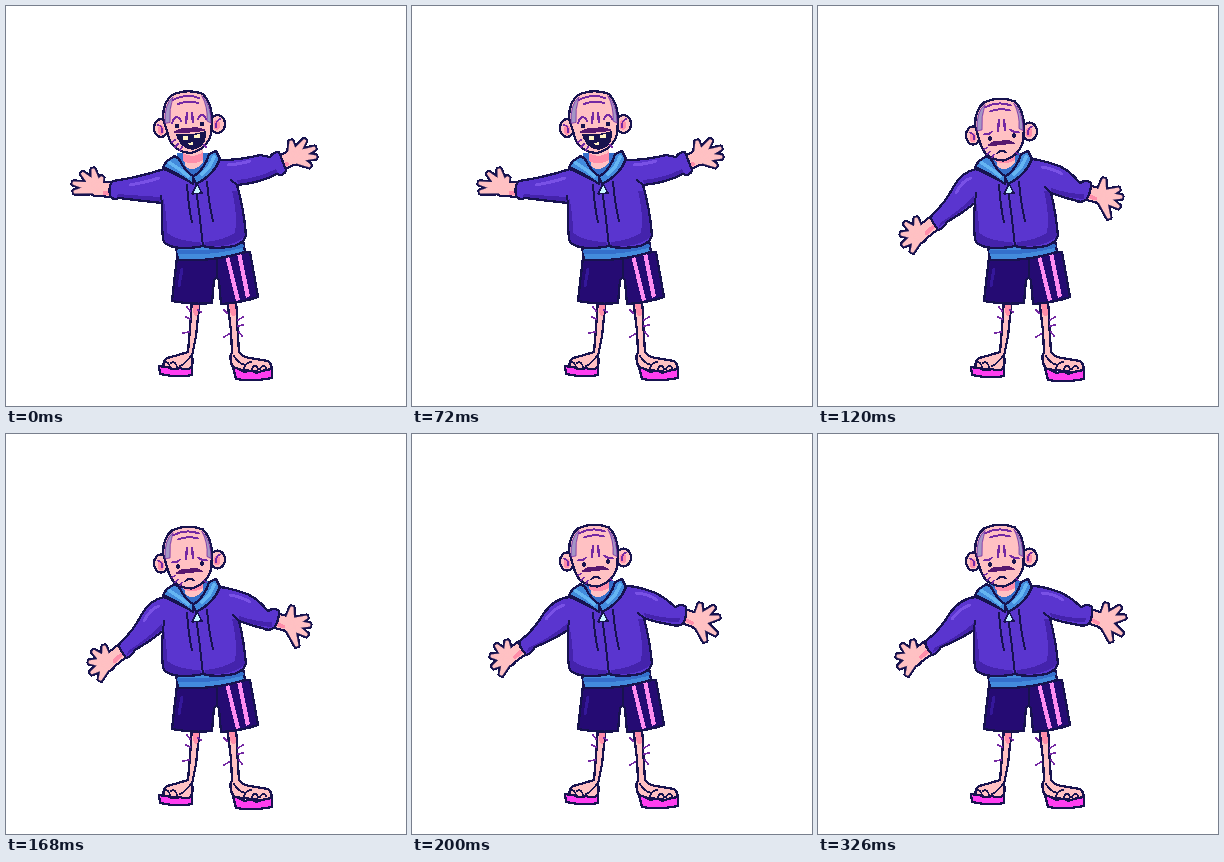
An HTML page that plays this animation: 400 px wide and 400 px high, repeating every 0.41 s.

```html
<!DOCTYPE html>
<html lang="en">
<head>
<meta charset="utf-8">
<title>Shrug</title>
<style>
html, body { margin: 0; width: 100%; height: 100%; overflow: hidden; background: #fff; }
svg { display: block; width: 100vw; height: 100vh; }
</style>
</head>
<body>
<svg id="stage" viewBox="0 0 400 400" shape-rendering="crispEdges" stroke-linecap="round" stroke-linejoin="round"></svg>
<script>
const INK = '#17134f', SKIN = '#ffc1c3', BLUSH = '#ff8da9', PLUM = '#7429a3', GREY = '#a495c5',
  COAT = '#5a35cf', COAT_DARK = '#4423ac', COAT_LIGHT = '#7951e6',
  BLUE = '#438bdc', DEEP_BLUE = '#346fcb', SKY = '#65b5f2', NAVY = '#250b73',
  PINK = '#ff8df1', MAGENTA = '#ff3ef0', WHISKER = '#56186f';
const LOOP = 410;

const shape = (d, fill, stroke = INK, width = 2.3) =>
  `<path d="${d}" fill="${fill}" stroke="${stroke}" stroke-width="${width}"/>`;
const blob = (d, fill) => shape(d, fill, 'none', 0);
const line = (d, color = INK, width = 2) => shape(d, 'none', color, width);
const oval = (x, y, rx, ry, fill, stroke = 'none', width = 2.3) =>
  `<ellipse cx="${x}" cy="${y}" rx="${rx}" ry="${ry}" fill="${fill}" stroke="${stroke}" stroke-width="${width}"/>`;

// A finger that narrows from the palm to a rounded tip.
function finger([x, y], [tipX, tipY]) {
  const length = Math.hypot(tipX - x, tipY - y);
  const nx = (y - tipY) / length, ny = (tipX - x) / length;
  const at = (px, py, w) => `${px + nx * w} ${py + ny * w}`;
  return `M${at(x, y, 5)}L${at(tipX, tipY, 1.2)}L${at(tipX, tipY, -1.2)}L${at(x, y, -5)}Z`;
}

// The skin pass covers the inner outlines.
function hand({ wrist, palm, tips }) {
  const [x, y] = palm;
  const arm = `M${wrist}L${palm}`;
  const fingers = tips.map(tip => finger(palm, tip)).join('');
  return line(arm, INK, 17) + oval(x, y, 9.5, 9.5, INK) + shape(fingers, INK, INK, 5)
    + line(arm, SKIN, 12.5) + oval(x, y, 7.2, 7.2, SKIN) + shape(fingers, SKIN, SKIN, .8)
    + line(`M${wrist[0]} ${wrist[1] + 3}l${(x - wrist[0]) * .5} ${(y - wrist[1]) * .5 + 1}`, BLUSH, 4);
}

function legs(dy) {
  return shape('M186 292L184 322L182 346Q173 349 161 352Q155 357 159 363L184 364Q188 357 186 350L190 330L194 292Z', SKIN)
    + shape('M221 292L225 325L226 346Q222 353 228 363L264 367Q268 360 262 355L244 352Q236 351 233 346L231 315L230 292Z', SKIN)
    + blob('M187 297H193L192 309Q187 312 187 303ZM223 297H229L230 309Q225 313 224 305Z', BLUSH)
    + line('M181 301l3 4M180 311l4 2M177 327l6 -1M192 304l3 2M218 331l5 -3M221 307l-3 -3M232 314l5 -3M232 320l5 -1M233 326l3 4', PLUM, 1.7)
    + `<g transform="translate(0 ${dy})">`
    + shape('M153 360Q157 361 162 361Q168 365 174 362Q181 365 186 361L186 369Q172 372 154 368Z', MAGENTA)
    + shape('M227 361Q234 363 239 366Q246 363 250 367Q258 364 266 363L266 372Q246 376 230 373Z', MAGENTA)
    + '</g>'
    + line('M158 357q4 -3 6 4M165 357q4 -3 6 4M174 360q5 -2 11 -10M237 364q3 -8 8 -8M246 363q3 -7 6 0M254 363q3 -6 6 -1M228 350q4 7 11 9', INK, 1.7);
}

function shorts() {
  return shape('M171 251L166 295Q186 299 206 297L208 274Q211 269 213 275L215 298Q235 297 252 291L244 246Z', NAVY)
    + blob('M219 250H223L234 294L230 295ZM231 247H235L244 290L240 292Z', PINK)
    + line('M176 263L173 280', '#34179a', 3)
    + line('M211 252L211 270', INK, 2)
    + shape('M170 241L172 254Q207 256 239 246L237 234Z', BLUE)
    + line('M173 246Q205 248 236 240', DEEP_BLUE, 4);
}

function coat({ sleeves, shade, shine, folds }) {
  const outline = sleeves[0] + 'Q155 216 157 234Q161 242 178 242Q189 242 197 240Q206 243 223 241Q237 239 240 230' + sleeves[1];
  return shape(outline, COAT)
    + blob('M226 185Q232 210 229 227Q215 235 199 236L198 240Q222 243 239 231Q238 206 232 185ZM157 190Q161 208 161 227Q174 236 194 236L196 240Q165 245 158 234Q156 216 157 190Z', COAT_DARK)
    + blob(shade, COAT_DARK) + line(shine, COAT_LIGHT, 3)
    + line(outline, INK, 2.3) + line(folds)
    + line('M190 183Q194 210 197 240M181 179Q183 204 186 216M201 176Q203 198 207 215');
}

function hood() {
  return blob('M171 147H205L200 164L187 173L174 162Z', DEEP_BLUE)
    + blob('M177 142H197V156Q188 168 179 160Z', SKIN)
    + blob('M177 147Q187 153 197 146V154Q187 160 177 155Z', BLUSH)
    + shape('M169 150Q160 154 157 161Q173 168 187 178L188 171Q178 164 173 153Z', BLUE)
    + shape('M203 148L210 145L214 153Q208 169 190 178L187 171Q199 163 203 148Z', BLUE)
    + line('M164 157Q174 163 182 170M208 151Q204 162 196 168', SKY, 3.5)
    + shape('M191 178L186 188L196 187Z', '#c8f6ff', INK, 1.5);
}

function happyFace() {
  return line('M166 117Q170 106 175 115M192 113Q196 104 200 113', PLUM, 2)
    + oval(171, 120, 2, 2.3, INK) + oval(196, 118, 2, 2.3, INK)
    + shape('M171 129Q186 130 199 126Q200 141 187 143Q175 142 171 129Z', INK, INK, 1.5)
    + blob('M177 130h5v4h-5ZM188 129l6 -1v4h-6ZM182 137l5 -1v3h-4Z', '#fff2c3')
    + shape('M168 126Q176 121 183 123Q190 120 199 124Q190 126 184 126Q176 127 168 126Z', WHISKER, WHISKER, 1);
}

function sadFace() {
  return line('M166 121Q172 121 174 118M192 116Q196 119 201 119', PLUM, 2)
    + oval(172, 125, 2.2, 2.4, INK) + oval(196, 122, 2.2, 2.4, INK)
    + shape('M170 132Q177 126 183 128Q190 125 197 130Q190 130 184 131Q177 132 170 132Z', WHISKER, WHISKER, 1)
    + line('M179 140Q183 135 188 139', INK, 2);
}

function head(dy, happy) {
  return `<g transform="translate(0 ${dy})">`
    + oval(155, 122, 7, 9, SKIN, INK) + oval(211.5, 118, 7.5, 9, SKIN, INK)
    + oval(155, 124, 3.2, 5, BLUSH) + oval(211, 119, 3.5, 5, BLUSH)
    + line('M152 119q5 1 4 7M214 113q-5 2 -4 8', PLUM, 1.6)
    + shape('M157 112Q157 96 166 89Q182 82 197 88Q206 97 206 114L205 128Q201 143 185 147Q168 146 163 132Z', SKIN)
    + shape('M159 117Q158 98 167 91Q163 103 164 116ZM196 90Q205 98 205 117L201 115Q202 101 196 90Z', GREY, PLUM, .8)
    + line('M167 94Q180 87 193 92M172 98Q182 94 192 97', PLUM, 2)
    + line('M181 107L180 117M186 107L187 116', PLUM, 2.4)
    + line('M166 136l3 -2M169 141l3 -3M174 144l2 -3M198 139l2 2', PLUM, 1.6)
    + (happy ? happyFace() : sadFace()) + '</g>';
}

const poses = [
  {
    until: 120, headY: 0, happy: true, footY: 0,
    left: { wrist: [106, 184], palm: [91, 182], tips: [[68, 186], [67, 177], [76, 167], [87, 163], [96, 171]] },
    right: { wrist: [275, 157], palm: [287, 151], tips: [[285, 135], [299, 134], [309, 142], [310, 151], [304, 160]] },
    coat: {
      sleeves: [
        'M158 163Q130 172 107 175Q102 179 104 190Q108 195 113 192Q137 195 156 197',
        'Q238 203 231 179Q254 177 271 168Q278 171 280 164L273 146Q267 146 264 151L254 149Q235 154 214 154L187 177Z'
      ],
      shade: 'M112 188Q137 190 156 191V196L111 191ZM231 174Q252 172 270 163L272 167Q254 176 232 178Z',
      shine: 'M124 179Q141 176 153 172M222 159Q235 158 244 155',
      folds: 'M156 197L155 190M231 179L225 174'
    }
  },
  {
    until: 200, headY: 7.5, happy: false, footY: 1,
    left: { wrist: [116, 217], palm: [101, 229], tips: [[98, 212], [87, 217], [83, 228], [85, 239], [94, 246]] },
    right: { wrist: [271, 187], palm: [283, 190], tips: [[286, 173], [301, 183], [304, 191], [301, 201], [291, 212]] },
    coat: {
      sleeves: [
        'M158 163Q144 166 136 180Q127 197 115 208Q112 211 114 215L120 224Q126 222 129 216Q143 208 157 197',
        'Q238 207 233 187Q247 192 256 194Q264 198 269 193Q273 186 273 177Q268 173 262 177Q249 161 235 158Q223 154 214 153L187 177Z'
      ],
      shade: 'M122 217Q140 206 156 190V196Q139 208 121 221ZM233 182Q251 188 266 188L266 193Q249 192 233 186Z',
      shine: 'M138 187Q144 175 153 172M224 161Q236 163 244 168',
      folds: 'M157 197L158 187M233 187L227 181'
    }
  },
  {
    until: 410, headY: 5.5, happy: false, footY: 0,
    left: { wrist: [110, 214], palm: [96, 224], tips: [[95, 207], [84, 211], [79, 222], [81, 233], [89, 241]] },
    right: { wrist: [274, 183], palm: [286, 187], tips: [[288, 170], [302, 173], [307, 183], [304, 200], [293, 207]] },
    coat: {
      sleeves: [
        'M158 163Q143 164 132 179Q122 196 109 206Q106 209 109 214L114 221Q120 219 123 213Q141 206 156 196',
        'Q238 207 232 184Q247 189 256 190Q268 194 272 188Q275 181 274 173Q270 169 263 173Q250 160 235 156Q223 152 214 152L187 177Z'
      ],
      shade: 'M116 214Q138 204 156 189V195Q138 206 115 218ZM232 179Q252 185 268 184L267 188Q249 188 233 183Z',
      shine: 'M134 185Q142 174 152 171M224 159Q237 160 245 166',
      folds: 'M156 196L157 187M232 184L226 179'
    }
  }
];

const drawPose = pose => legs(pose.footY) + shorts() + hand(pose.left) + hand(pose.right)
  + coat(pose.coat) + hood() + head(pose.headY, pose.happy);

const stage = document.getElementById('stage');
let shown = null;

function render(time) {
  const pose = poses.find(p => time % LOOP < p.until);
  if (pose !== shown) {
    stage.innerHTML = drawPose(pose);
    shown = pose;
  }
}

const start = performance.now();
function tick() {
  render(Math.max(0, performance.now() - start));
  requestAnimationFrame(tick);
}
tick();
</script>
</body>
</html>
```
